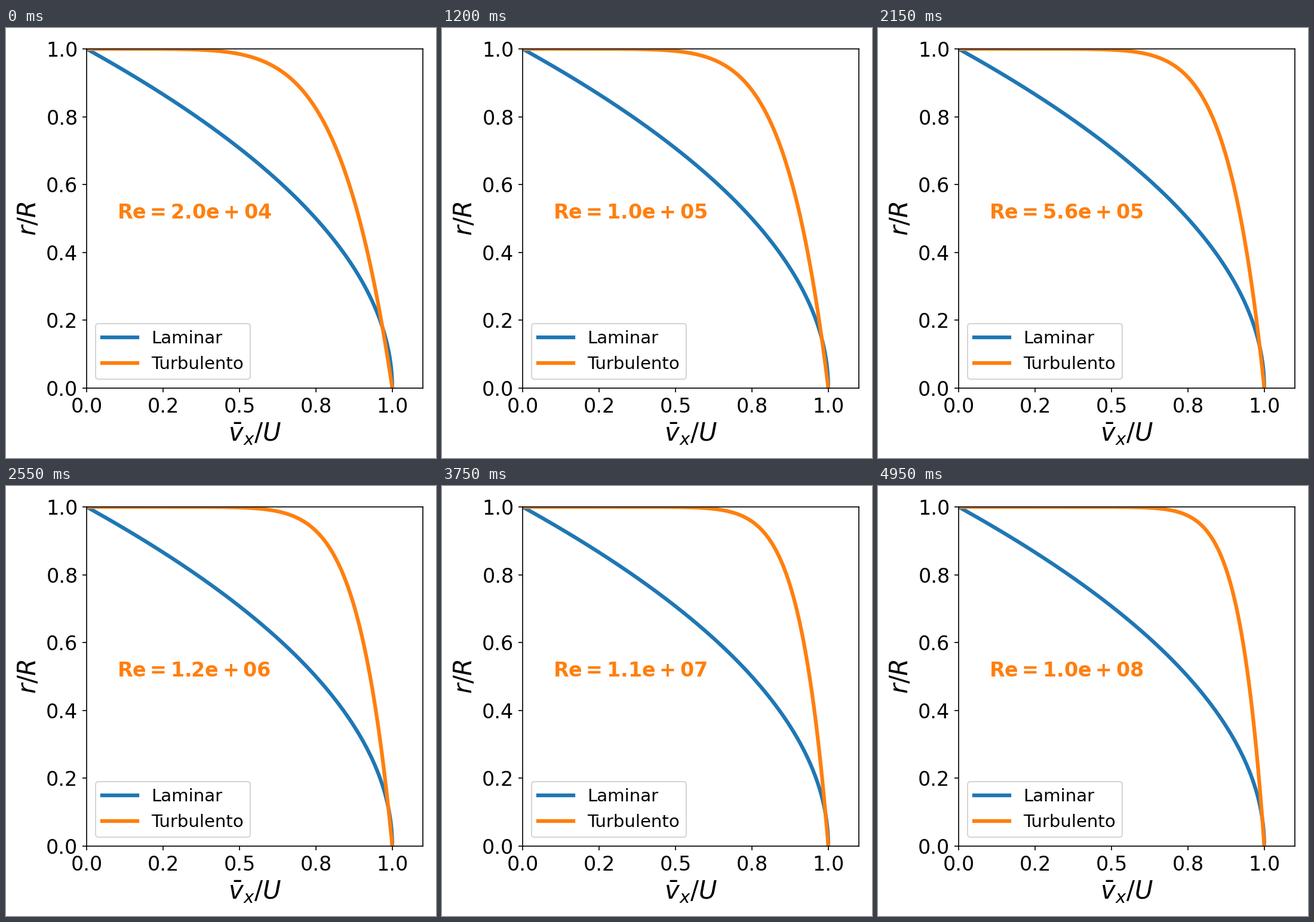
A matplotlib script that plays this animation: 720x720 px, repeating every 5 s.

```python
import numpy as np
import matplotlib.pyplot as plt
from matplotlib.animation import FuncAnimation

SIZE, DPI = 720, 150
FRAMES, INTERVAL = 100, 50
LEFT, RIGHT, TOP, BOTTOM = 135, 698, 35, 603  # axes box in pixels

plt.rcParams["font.family"] = "DejaVu Sans"

# Reynolds numbers rise almost geometrically
reynolds = 1e4 + np.logspace(4, 8, FRAMES)


def turbulent_radius(v, re):
    """Radius at which the power-law profile reaches velocity v."""
    n = 1.8 * np.log10(re) - 1.7
    return 1 - v**n


def re_label(re):
    return rf"$\mathbf{{Re = {re:.1e}}}$"


fig = plt.figure(figsize=(SIZE / DPI, SIZE / DPI), dpi=DPI, facecolor="white")
ax = fig.add_axes([LEFT / SIZE, 1 - BOTTOM / SIZE,
                   (RIGHT - LEFT) / SIZE, (BOTTOM - TOP) / SIZE])

r = np.linspace(0, 1, 1000)
v = np.linspace(0, 1, 1000)
ax.plot(1 - r**2, r, color="C0", lw=3, label="Laminar")
curve, = ax.plot(v, turbulent_radius(v, reynolds[0]), color="C1", lw=3,
                 label="Turbulento")
label = ax.text(0.1, 0.5, re_label(reynolds[0]), color="C1", fontsize=16)

ax.set_xlim(0, 1.1)
ax.set_ylim(0, 1)
ax.set_xticks(np.arange(0, 1.01, 0.25))
ax.xaxis.set_major_formatter("{x:.1f}")
ax.tick_params(labelsize=16)
ax.set_xlabel(r"$\bar{v}_x/U$", fontsize=20)
ax.set_ylabel(r"$r/R$", fontsize=20)
ax.legend(loc="lower left", fontsize=14)


def update(i):
    curve.set_ydata(turbulent_radius(v, reynolds[i]))
    label.set_text(re_label(reynolds[i]))
    return curve, label


anim = FuncAnimation(fig, update, frames=FRAMES, interval=INTERVAL,
                     repeat=True, repeat_delay=0)
plt.show()
```
